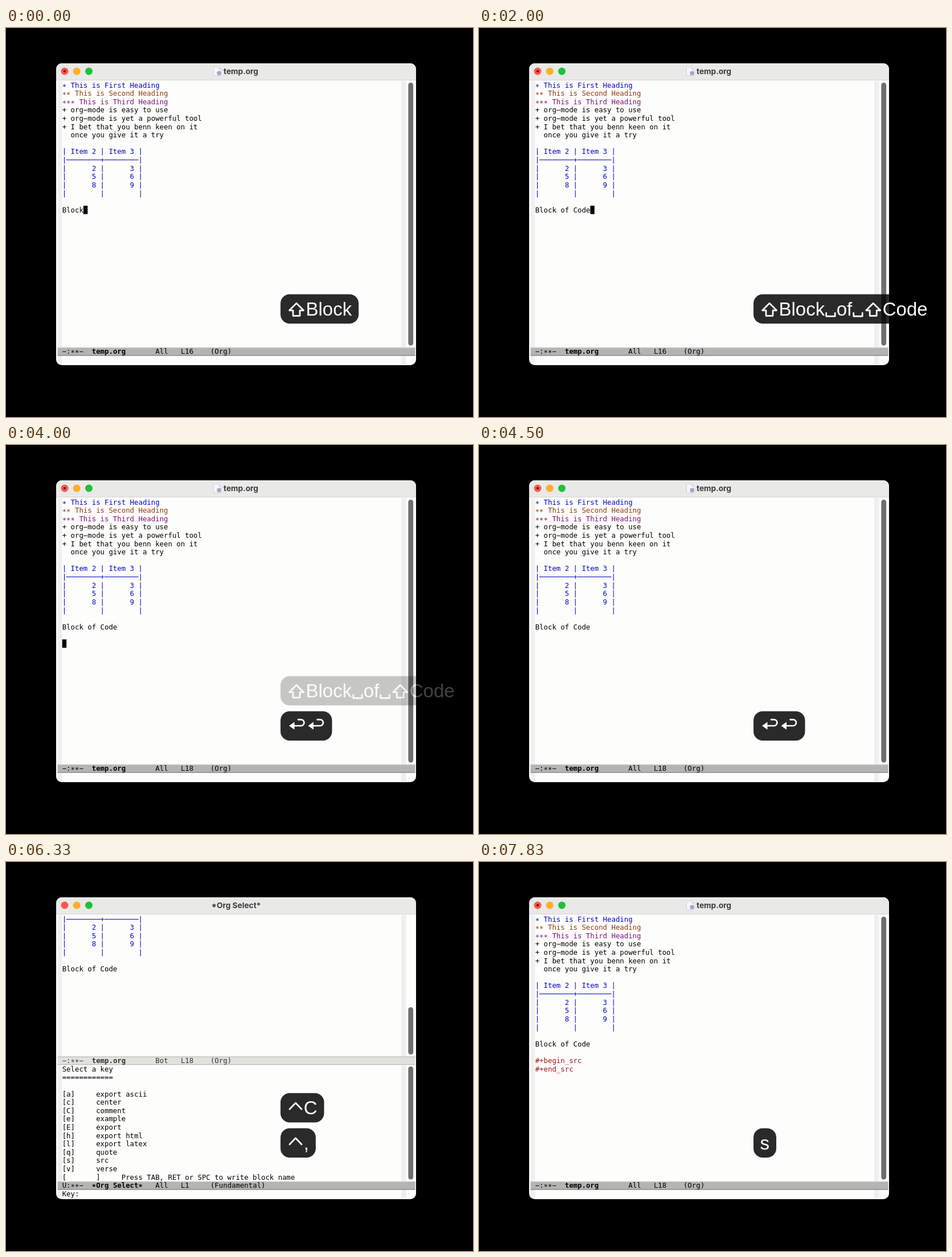
Recreate the animation shown at these times as an HTML page. Size 820 by 683 pixels, loop 8 s.

```html
<!DOCTYPE html>
<html lang="en">
<head>
<meta charset="utf-8">
<title>Org editing</title>
<style>
  html, body { margin: 0; width: 100%; height: 100%; overflow: hidden; background: #000; }
  svg { display: block; width: 100vw; height: 100vh; }
  text { white-space: pre; }
  .mono { font: 12.35px "DejaVu Sans Mono", monospace; }
  .title { font: 700 13.7px Inter, sans-serif; fill: #3c3c3c; }
  .key { font: 33px "Liberation Sans", Arial, sans-serif; fill: #fff; }
</style>
</head>
<body>
<svg viewBox="0 0 820 683" xmlns="http://www.w3.org/2000/svg">
  <rect width="820" height="683" fill="#000"/>
  <clipPath id="frame"><rect x="88" y="62" width="632" height="530" rx="10"/></clipPath>
  <g clip-path="url(#frame)">
    <rect x="88" y="62" width="632" height="530" fill="#fdfdfb"/>
    <rect x="88" y="62" width="632" height="29.5" fill="#e9e9e8"/>
    <rect x="88" y="91" width="632" height="1" fill="#d6d6d5"/>
    <rect x="90.5" y="93" width="8" height="497" fill="#f0f0f0"/>
    <rect x="694" y="93" width="8.5" height="497" fill="#efefef"/>
  </g>
  <circle cx="103" cy="76" r="6.5" fill="#fd564f"/>
  <circle cx="124.2" cy="76" r="6.5" fill="#fdae25"/>
  <circle cx="145.5" cy="76" r="6.5" fill="#1fc13b"/>
  <g id="view"></g>
  <g id="keys"></g>
</svg>
<script>
const LOOP = 8000, LEFT = 98.7, TOP = 92.8, ROW = 14.62, COL = 7.435;
const BLUE = '#0606c6', RED = '#a21616';

const HEAD = [
  ['* This is First Heading', BLUE],
  ['** This is Second Heading', '#8f3a10'],
  ['*** This is Third Heading', '#7a1379'],
  ['+ org-mode is easy to use'],
  ['+ org-mode is yet a powerful tool'],
  ['+ I bet that you benn keen on it'],
  ['  once you give it a try'],
  [''],
  ['| Item 2 | Item 3 |', BLUE]
];
const TABLE = [
  '|────────+────────|',
  '|      2 |      3 |',
  '|      5 |      6 |',
  '|      8 |      9 |',
  '|        |        |',
  ''
].map(s => [s, BLUE]);
const MENU = [
  'Select a key', '============', '',
  ...['a export ascii', 'c center', 'C comment', 'e example', 'E export',
    'h export html', 'l export latex', 'q quote', 's src', 'v verse']
    .map(s => `[${s[0]}]     ${s.slice(2)}`),
  '[       ]     Press TAB, RET or SPC to write block name'
].map(s => [s]);

// Key presses, grouped by the bubble that shows them.
const TYPED = [[-900, '⇧Bloc'], [0, 'k'], [330, ' '], [500, 'o'], [830, 'f'], [1000, ' '],
  [1330, '⇧C'], [1500, 'o'], [1670, 'd'], [1830, 'e']];
const RETURNS = [[2670, '↩'], [2900, '↩']];
const MENU_AT = 5500, PICK_AT = 7000;
const BUBBLES = [TYPED, RETURNS, [[4670, '^C']], [[MENU_AT, '^,']], [[PICK_AT, 's']]];
const EDITS = [...TYPED, ...RETURNS, [PICK_AT, '']];

const view = document.getElementById('view');
const keys = document.getElementById('keys');
const pen = document.createElement('canvas').getContext('2d');
pen.font = '33px "Liberation Sans", Arial, sans-serif';

const rowY = row => TOP + row * ROW;
const glyphs = s => s.replace(/\*/g, '∗').replace(/-/g, '−');
const pressed = (list, t) => list.filter(k => k[0] <= t);
const joined = list => list.map(k => k[1]).join('');

const rect = (x, y, w, h, fill, rx = 0) =>
  `<rect x="${x}" y="${y}" width="${w}" height="${h}" rx="${rx}" fill="${fill}"/>`;

function mono(s, col, row, fill = '#000', weight = 400) {
  return `<text class="mono" x="${LEFT + col * COL}" y="${rowY(row) + 11.7}" fill="${fill}" font-weight="${weight}" style="font-weight:${weight}">${glyphs(s)}</text>`;
}

const lines = (list, from) => list.map(([s, fill], i) => s && mono(s, 0, from + i, fill)).join('');

const thumb = (top, bottom) => rect(706.3, top, 8.8, bottom - top, '#6e6e6e', 4.4);

function modeLine(row, active, flags, name, pos, line, mode) {
  const y = rowY(row) + 0.2, ink = active ? '#000' : '#333';
  return rect(90.5, y, 628, 14.6, active ? '#b4b4b3' : '#e1e1df') +
    rect(90.5, y, 628, 1, active ? '#d0d0d0' : '#b5b5a6') +
    rect(90.5, y + 13.6, 628, 1, active ? '#757575' : '#b5b5a6') +
    mono(flags, 0, row, ink) + mono(name, 7, row, ink, 700) +
    mono(pos, 22, row, ink) + mono('L' + line, 28, row, ink) + mono(mode, 35, row, ink);
}

function selectView() {
  return '<text class="title" x="404" y="80.6" text-anchor="middle">*Org Select*</text>' +
    lines([...TABLE, ['Block of Code']], 0) + thumb(255, 338) +
    modeLine(17, false, '-:**-', 'temp.org', 'Bot', 18, '(Org)') +
    lines(MENU, 18) + thumb(359, 557.5) +
    modeLine(32, true, 'U:**-', '*Org Select*', 'All', 1, '(Fundamental)') +
    mono('Key:', 0, 33);
}

function fileView(t) {
  const text = joined(pressed(TYPED, t)).replace(/⇧/g, '');
  const breaks = pressed(RETURNS, t).length;
  const picked = t >= PICK_AT;
  const last = pressed(EDITS, t).pop()[0];
  const col = picked ? 12 : breaks ? 0 : text.length;
  const caret = (t - last) % 1000 < 500
    ? rect(LEFT + col * COL, rowY(15 + breaks), COL, ROW, '#000') : '';
  const block = picked ? [['#+begin_src', RED], ['#+end_src', RED]] : [];
  return '<circle cx="103" cy="76" r="2.1" fill="#4d0503"/>' +
    '<path d="M364.5 68.5h8.5l4 4v11h-12.5z" fill="#f6f6fa" stroke="#c9c9d2" stroke-width=".8"/>' +
    '<path d="M373 68.5v4h4z" fill="#d2d2da"/>' +
    '<circle cx="374" cy="79.2" r="3.7" fill="#a7a2cf"/>' +
    '<text class="title" x="382" y="80.6">temp.org</text>' +
    lines([...HEAD, ...TABLE, [text], [''], ...block], 0) + caret + thumb(96, 557.5) +
    modeLine(32, true, '-:**-', 'temp.org', 'All', 16 + breaks, '(Org)');
}

// Advance width and outline of the drawn key symbols.
const SYMBOLS = {
  '⇧': [33, 'M16.5-22 29-9.5H22.5V0H10.5V-9.5H4Z'],
  '^': [29.2, 'M4.5-9.5 15-20.5 25.5-9.5'],
  ' ': [20.5, 'M2.5-5V.8H18V-5'],
  '↩': [33.5, 'M8-12.3H24.5a5.4 5.4 0 0 0 0-10.8H19.5']
};

function bubble(s, row, alpha) {
  let x = 11.5, body = '';
  for (const run of s.match(/[⇧^ ↩]|[^⇧^ ↩]+/g)) {
    const symbol = SYMBOLS[run];
    if (symbol) {
      body += `<path d="${symbol[1]}" transform="translate(${x} 37.7)" fill="none" stroke="#fff" stroke-width="2.7" stroke-linejoin="round" stroke-linecap="round"/>`;
      if (run === '↩') body += `<path d="M3.5-12.3 13-19V-5.6Z" transform="translate(${x} 37.7)" fill="#fff"/>`;
      x += symbol[0];
    } else {
      body += `<text class="key" x="${x}" y="37.7">${run}</text>`;
      x += pen.measureText(run).width;
    }
  }
  return `<g transform="translate(482 ${467.6 - row * 61.8})" opacity="${alpha.toFixed(3)}">` +
    rect(0, 0, x + 12, 51.4, 'rgba(0,0,0,.83)', 16) + body + '</g>';
}

function bubbles(t) {
  const shown = BUBBLES.map(b => pressed(b, t)).filter(b => b.length).reverse();
  return shown.map((b, row) => {
    const age = t - b[b.length - 1][0];
    const alpha = Math.min(1, 1 - (age - 2000) / 230);
    return alpha > 0 ? bubble(joined(b), row, alpha) : '';
  }).join('');
}

const drawn = new Map();
function put(node, html) {
  if (drawn.get(node) === html) return;
  drawn.set(node, html);
  node.innerHTML = html;
}

function render(t) {
  put(view, t >= MENU_AT && t < PICK_AT ? selectView() : fileView(t));
  put(keys, bubbles(t));
}

const start = performance.now();
function tick() {
  render((performance.now() - start) % LOOP);
  requestAnimationFrame(tick);
}
tick();
</script>
</body>
</html>
```
